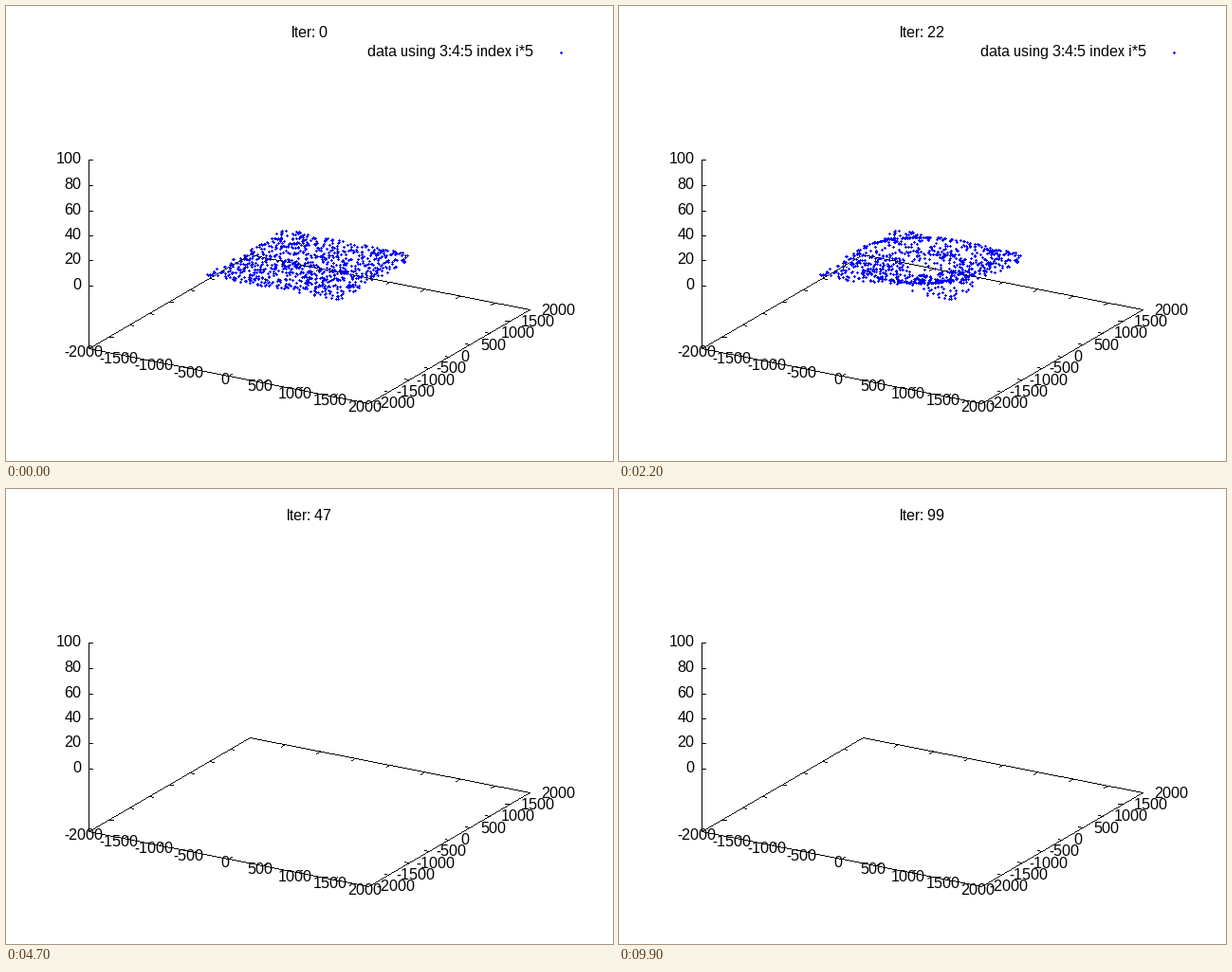
These frames come from a looping animation (640 by 480 pixels, 10 s). A matplotlib script:

```python
import numpy as np
import matplotlib.pyplot as plt
from matplotlib.animation import FuncAnimation

W, H, DPI = 640, 480, 100
FRAMES, DATA_FRAMES = 100, 40
BLACK, BLUE = (0, 0, 0), (0, 0, 255)

plt.rcParams["font.family"] = "Liberation Sans"
plt.rcParams["text.hinting"] = "default"
plt.rcParams["text.hinting_factor"] = 1

# Screen geometry of the base plane (z = -50) and the vertical scale
CORNER = np.array([87.0, 361.0])
X_EDGE = np.array([295.0, 58.0])
Y_EDGE = np.array([170.0, -99.0])
Z_SCALE = 1.325


def project(x, y, z=-50):
    u, v = (np.asarray(x) + 2000) / 4000, (np.asarray(y) + 2000) / 4000
    sx = CORNER[0] + u * X_EDGE[0] + v * Y_EDGE[0]
    sy = CORNER[1] + u * X_EDGE[1] + v * Y_EDGE[1] - (z + 50) * Z_SCALE
    return sx, sy


fig = plt.figure(figsize=(W / DPI, H / DPI), dpi=DPI, facecolor="white")
ax = fig.add_axes([0, 0, 1, 1])
ax.axis("off")
backdrop = np.full((H, W, 3), 255, np.uint8)


def line(p, q):
    """One-pixel line without antialiasing."""
    p, q = np.rint(p), np.rint(q)
    steps = int(np.abs(q - p).max()) + 1
    x, y = np.rint(np.linspace(p, q, steps)).astype(int).T
    backdrop[y, x] = BLACK


def label(x, y, s, ha):
    return ax.text(x, y, s, ha=ha, va="baseline", fontsize=16 * 72 / DPI,
                   color="black", zorder=4)


def tick(p, direction, size=4.5):
    line(p, np.array(p) + size * direction / np.hypot(*direction))


def draw_axes():
    ring = [project(*c) for c in
            [(-2000, -2000), (2000, -2000), (2000, 2000), (-2000, 2000)]]
    for a, b in zip(ring, ring[1:] + ring[:1]):
        line(a, b)
    line(ring[0], (87, 162))
    for v in range(-2000, 2001, 500):
        front, right = project(v, -2000), project(2000, v)
        if abs(v) < 2000:
            tick(front, Y_EDGE)
            tick(project(v, 2000), -Y_EDGE)
            tick(right, -X_EDGE)
            tick(project(-2000, v), X_EDGE)
        label(front[0] - (5 if v < 0 else 3.5), front[1] + 9, str(v), "center")
        label(right[0] + (8 if v < 0 else 12), right[1] + 5.5, str(v), "left")
    for z in range(0, 101, 20):
        y = round(295 - z * Z_SCALE)
        line((87, y), (91, y))
        label(79.5, y + 4, str(z), "right")


# Water surface sampled at random places
rng = np.random.default_rng(7)
COUNT = 900
px = rng.uniform(-950, 950, COUNT)
py = rng.uniform(-930, 1025, COUNT)
radius, angle = np.hypot(px, py), np.arctan2(py, px)
PLUS = [(0, 0), (1, 0), (-1, 0), (0, 1), (0, -1)]


def surface(t):
    """A crater opens behind a low rim, then a jet shoots up."""
    def key(*values):
        return np.interp(t, [0, 13, 22, 30, 37, 40], values)

    edge = key(200, 570, 600, 620, 620, 620)
    power = key(1, 0.68, 0.55, 0.65, 0.85, 0.9)
    rim = key(150, 620, 850, 950, 1050, 1100)
    height = key(0, 2.5, 4.5, 2, 0.5, 0)
    jet = 85 * max(0, (t - 30) / 7)

    r = np.where(radius < edge, edge * (radius / edge) ** power, radius)
    z = height * np.exp(-((r - rim) / 130) ** 2)
    z += jet * np.exp(-(r / 190) ** 2)
    return project(r * np.cos(angle), r * np.sin(angle), z)


def stamp(img, x, y):
    x, y = np.rint(x).astype(int), np.rint(y).astype(int)
    for dx, dy in PLUS:
        img[np.clip(y + dy, 0, H - 1), np.clip(x + dx, 0, W - 1)] = BLUE


draw_axes()
title = label(320, 33, "", "center")
legend = label(556, 53, "data using 3:4:5 index i*5", "right")
picture = ax.imshow(backdrop, extent=(0, W, H, 0),
                    interpolation="nearest", aspect="auto")
ax.set_xlim(0, W)
ax.set_ylim(H, 0)


def update(i):
    title.set_text(f"Iter: {i}")
    shown = i < DATA_FRAMES
    legend.set_visible(shown)
    img = backdrop.copy()
    if shown:
        stamp(img, *surface(i))
        stamp(img, 585, 49)
    picture.set_data(img)
    return title, legend, picture


anim = FuncAnimation(fig, update, frames=FRAMES, interval=100,
                     repeat=True, repeat_delay=0, blit=False)
plt.show()
```
